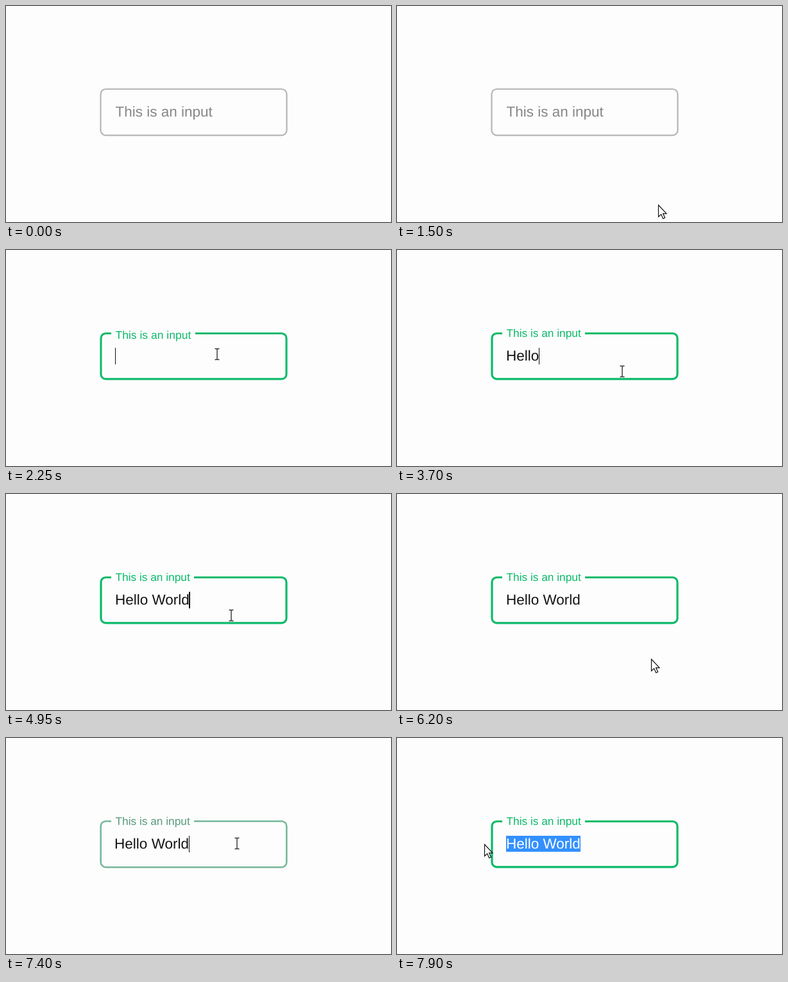
An HTML page for the animation above (8 s loop, 600 px wide and 338 px high).

```html
<!DOCTYPE html>
<html lang="en">
<head>
<meta charset="utf-8">
<title>Floating label input</title>
<style>
  html, body { margin: 0; width: 100%; height: 100%; overflow: hidden; background: #fdfdfe; }
  #stage {
    position: relative; width: 600px; height: 338px; overflow: hidden;
    font: 22.5px "Liberation Sans", Arial, sans-serif;
    text-rendering: geometricPrecision;
  }
  #stage > * { position: absolute; white-space: pre; }
  svg { left: 0; top: 0; width: 600px; height: 338px; }
  #label { left: 164px; padding: 0 6.5px; line-height: 1.15; background: #fdfdfe; }
  #value { top: 153px; line-height: 26px; color: #141414; }
  #picked { background: #3390ff; color: #fff; }
  #caret { top: 153px; width: 1.4px; height: 26px; background: #111; }
</style>
</head>
<body>
<div id="stage">
  <svg><rect id="frame" fill="none"/></svg>
  <div id="label">This is an input</div>
  <div id="value"><span id="plain"></span><span id="picked"></span></div>
  <div id="caret"></div>
  <svg>
    <g id="mouse">
      <path id="arrow" d="M.5 .5V18.8L4.7 14.9L7.7 21.8L10.6 20.5L7.6 13.8H13Z"
        fill="#fff" stroke="#111" stroke-width="1.2"/>
      <path id="beam" d="M-3.5 -8.5H-1Q0 -8.5 0 -7.5Q0 -8.5 1 -8.5H3.5M0 -7.5V7.5M-3.5 8.5H-1Q0 8.5 0 7.5Q0 8.5 1 8.5H3.5"
        fill="none" stroke="#333" stroke-width="1.4"/>
    </g>
  </svg>
</div>
<script>
const LOOP = 8000, FADE = 300;
const GRAY = [181, 181, 181], LABEL_GRAY = [134, 134, 134], GREEN = [9, 186, 104];
const FOCUS = 2030, BLUR = 6200, REFOCUS = 7330;
const TEXT = 'Hello World';
const KEYS = [3000, 3200, 3400, 3500, 3700, 3900, 4150, 4350, 4550, 4750, 4950];
const CARET_ON = [[FOCUS, 2550], [3000, 5500], [6000, BLUR], [REFOCUS, LOOP]];
const box = { left: 146.4, top: 128.9, right: 438.6, bottom: 203.5, radius: 9 };

const smooth = u => u * u * (3 - 2 * u);
const slowDown = u => 1 - (1 - u) ** 2;
// time, x, y, easing towards the next point
const PATH = [
  [1500, 407, 311, slowDown], [2030, 329, 163], [2300, 329, 163], [2550, 351, 190],
  [5670, 351, 190], [6010, 396, 258], [6750, 396, 258], [7320, 360, 165],
  [7600, 360, 165], [7900, 136, 166]
];

const el = id => document.getElementById(id);
const [frame, label, value, plain, picked, caret, mouse, arrow, beam] =
  ['frame', 'label', 'value', 'plain', 'picked', 'caret', 'mouse', 'arrow', 'beam'].map(el);
const pen = document.createElement('canvas').getContext('2d');
pen.font = '22.5px "Liberation Sans", Arial, sans-serif';

const clamp = u => Math.min(1, Math.max(0, u));
const mix = (a, b, u) => a + (b - a) * u;
const blend = (a, b, u) => `rgb(${a.map((v, i) => Math.round(mix(v, b[i], u)))})`;
const show = (node, on) => { node.style.visibility = on ? 'visible' : 'hidden'; };
const widthOf = n => pen.measureText(TEXT.slice(0, n)).width;

// The CSS "ease" curve
function ease(u) {
  let lo = 0, hi = 1, s = u;
  for (let i = 0; i < 20; i++) {
    s = (lo + hi) / 2;
    const x = 0.75 * s * (1 - s) + s ** 3;
    if (x < u) lo = s; else hi = s;
  }
  return 0.3 * (1 - s) ** 2 * s + 3 * (1 - s) * s * s + s ** 3;
}
const since = (t, start) => ease(clamp((t - start) / FADE));

function mouseAt(t) {
  const next = PATH.findIndex(p => p[0] > t);
  if (next < 1) return PATH[next < 0 ? PATH.length - 1 : 0].slice(1, 3);
  const [t0, x0, y0, easing = smooth] = PATH[next - 1];
  const [t1, x1, y1] = PATH[next];
  const u = easing((t - t0) / (t1 - t0));
  return [mix(x0, x1, u), mix(y0, y1, u)];
}

function drawFrame(focus) {
  const w = mix(2.2, 3.2, focus);
  const attrs = {
    x: box.left + w / 2, y: box.top + w / 2,
    width: box.right - box.left - w, height: box.bottom - box.top - w,
    rx: box.radius - w / 2, stroke: blend(GRAY, GREEN, focus), 'stroke-width': w
  };
  for (const k in attrs) frame.setAttribute(k, attrs[k]);
}

function drawLabel(focus, lift) {
  label.style.fontSize = mix(22.5, 17.3, lift) + 'px';
  label.style.top = mix(153.5, 121.4, lift) + 'px';
  label.style.color = blend(LABEL_GRAY, GREEN, focus);
}

function drawValue(t, focus, x) {
  const left = mix(168.6, 170, focus);
  const typed = KEYS.filter(k => k <= t).length;
  let split = typed;
  if (t > REFOCUS) {
    while (split > 0 && x < left + (widthOf(split - 1) + widthOf(split)) / 2) split--;
  }
  value.style.left = left + 'px';
  plain.textContent = TEXT.slice(0, split);
  picked.textContent = TEXT.slice(split, typed);
  caret.style.left = left + widthOf(typed) - 0.4 + 'px';
  show(caret, split === typed && CARET_ON.some(([a, b]) => t >= a && t < b));
}

function drawMouse(t, x, y) {
  const inside = x > box.left && x < box.right && y > box.top && y < box.bottom;
  mouse.setAttribute('transform', `translate(${x} ${y})`);
  show(arrow, t >= PATH[0][0] && !inside);
  show(beam, t >= PATH[0][0] && inside);
}

function render(t) {
  const lift = since(t, FOCUS);
  const focus = lift - since(t, BLUR) + since(t, REFOCUS);
  const [x, y] = mouseAt(t);
  drawFrame(focus);
  drawLabel(focus, lift);
  drawValue(t, focus, x);
  drawMouse(t, x, y);
}

let start;
function tick(now) {
  start ??= now;
  render((now - start) % LOOP);
  requestAnimationFrame(tick);
}
render(0);
requestAnimationFrame(tick);
</script>
</body>
</html>
```
